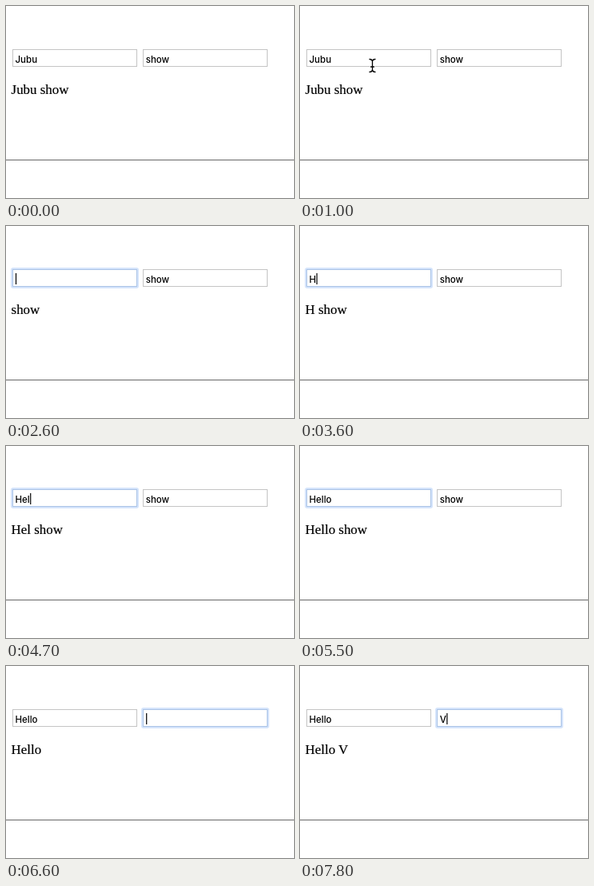
An HTML page for the animation above (8000 ms loop, 360 by 240 pixels).

```html
<!DOCTYPE html>
<html lang="en">
<head>
<meta charset="utf-8">
<title>Two bound text fields</title>
<style>
  html, body { margin: 0; width: 100%; height: 100%; overflow: hidden; background: #fff; }
  svg { display: block; width: 360px; height: 240px; }
  .field { fill: #fff; stroke: #c4c4c4; }
  .ring { fill: #d5e4fb; }
  .focus .field { stroke: #a9c3e6; }
  .ring, .caret { visibility: hidden; }
  .focus .ring, .caret.on { visibility: visible; }
  .value { font: 500 11.5px Inter, "Open Sans", sans-serif; }
  .caret { stroke: #000; stroke-width: 1.2; }
  #output { font: 16.9px "Liberation Serif", "Times New Roman", serif; stroke: #000; stroke-width: .2; }
  #beam path { fill: none; stroke-linecap: round; }
</style>
</head>
<body>
<svg viewBox="0 0 360 240">
  <g id="first">
    <rect class="ring" x="6" y="52" width="160" height="26" rx="3"/>
    <rect class="field" x="8.5" y="54.5" width="155" height="21"/>
    <text class="value" x="11.5" y="71"></text>
    <path class="caret" d="M0 59V73"/>
  </g>
  <g id="second">
    <rect class="ring" x="169" y="52" width="160" height="26" rx="3"/>
    <rect class="field" x="171.5" y="54.5" width="155" height="21"/>
    <rect id="selection" x="175" y="59" width="29" height="14" fill="#b4d5fe"/>
    <text class="value" x="174.7" y="71"></text>
    <path class="caret" d="M0 59V73"/>
  </g>
  <text id="output" x="6.6" y="110"></text>
  <path d="M0 192.5H360" stroke="#686868"/>
  <path id="arrow" d="M0 0V14.5L3.4 11.4L5.7 16.6L8 15.6L5.8 10.5H10.4Z" fill="#000" stroke="#fff" stroke-width=".9"/>
  <g id="beam">
    <path d="M-3.5 -8Q-.5 -8 0 -5.5Q.5 -8 3.5 -8M0 -5.5V5.5M-3.5 8Q-.5 8 0 5.5Q.5 8 3.5 8M-2 1.5H2" stroke="#fff" stroke-width="2.6"/>
    <path d="M-3.5 -8Q-.5 -8 0 -5.5Q.5 -8 3.5 -8M0 -5.5V5.5M-3.5 8Q-.5 8 0 5.5Q.5 8 3.5 8M-2 1.5H2" stroke="#000" stroke-width="1.3"/>
  </g>
</svg>
<script>
const LOOP = 8000;
const BLINK = 500;
const byId = id => document.getElementById(id);

// time, first value, second value, focused field, all selected
const steps = [
  [0, "Jubu", "show", null],
  [1200, "Jubu", "show", "first"],
  [2000, "Jub", "show", "first"],
  [2300, "Ju", "show", "first"],
  [2500, "J", "show", "first"],
  [2600, "", "show", "first"],
  [3600, "H", "show", "first"],
  [4300, "He", "show", "first"],
  [4700, "Hel", "show", "first"],
  [4800, "Hell", "show", "first"],
  [5000, "Hello", "show", "first"],
  [5700, "Hello", "show", "second", true],
  [6600, "Hello", "", "second"],
  [7800, "Hello", "V", "second"]
];

// time, x, y, pointer shape
const pointer = [
  [0, 0, 0, null],
  [700, 180, 176, "arrow"],
  [800, 134, 118, "arrow"],
  [900, 101, 85, "arrow"],
  [1000, 90.5, 74.5, "beam"],
  [1200, 0, 0, null]
];

const latest = (table, t) => table.findLast(row => row[0] <= t);
const show = (node, on) => node.setAttribute("visibility", on ? "visible" : "hidden");

function drawField(id, value, focused, caretOn) {
  const group = byId(id);
  const text = group.querySelector(".value");
  const caret = group.querySelector(".caret");
  group.classList.toggle("focus", focused);
  text.textContent = value;
  const width = value ? text.getComputedTextLength() : 0;
  const x = text.x.baseVal[0].value + width + 1;
  caret.setAttribute("transform", `translate(${x} 0)`);
  caret.classList.toggle("on", focused && caretOn);
}

function draw(t) {
  const [start, first, second, focus, selected = false] = latest(steps, t);
  const caretOn = !selected && Math.floor((t - start) / BLINK) % 2 === 0;
  drawField("first", first, focus === "first", caretOn);
  drawField("second", second, focus === "second", caretOn);
  show(byId("selection"), selected);
  byId("output").textContent = `${first} ${second}`.trim();

  const [, x, y, shape] = latest(pointer, t);
  for (const id of ["arrow", "beam"]) {
    const node = byId(id);
    show(node, id === shape);
    node.setAttribute("transform", `translate(${x} ${y})`);
  }
}

const origin = performance.now();
function tick() {
  draw((performance.now() - origin) % LOOP);
  requestAnimationFrame(tick);
}
tick();
</script>
</body>
</html>
```
